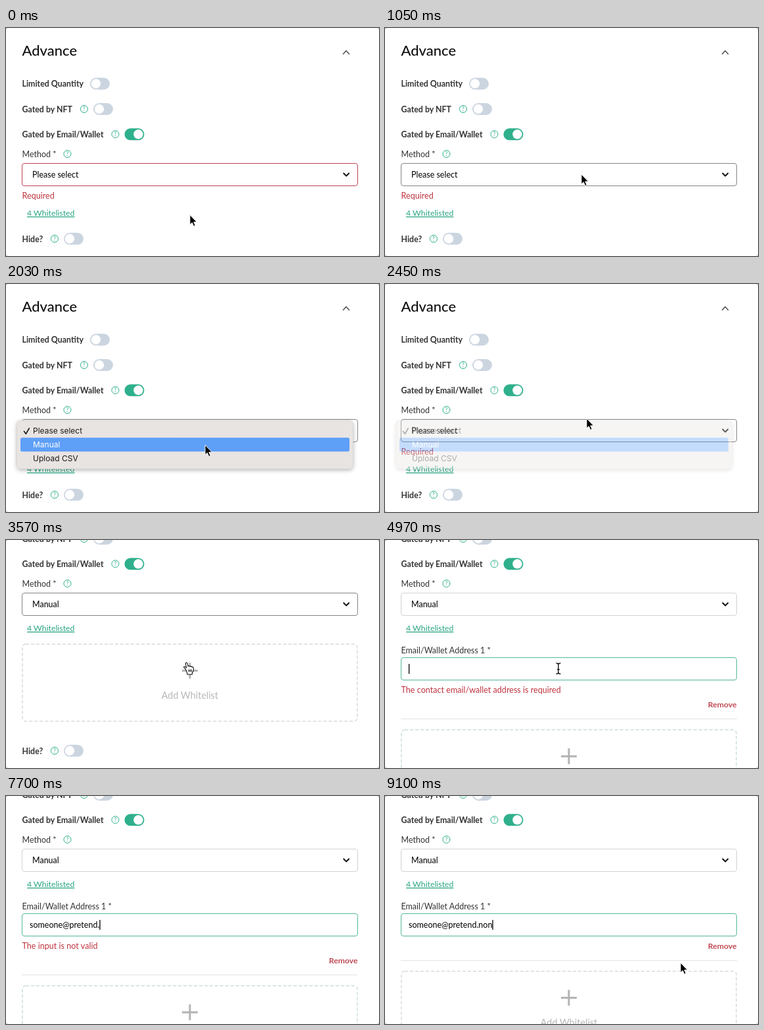
An HTML page for the animation above (9170 ms loop, 568 by 346 pixels).

```html
<!DOCTYPE html>
<html lang="en">
<head>
<meta charset="utf-8">
<title>Whitelist form</title>
<style>
  html, body { margin: 0; width: 100%; height: 100%; overflow: hidden; background: #c4c4c4; }
  svg { display: block; width: 100vw; height: 100vh; }
  text { font: 12.5px Lato, "Open Sans", sans-serif; fill: #333; white-space: pre; }
  .title { font-size: 22px; font-weight: 500; fill: #111; }
  .label { font-size: 12.4px; font-weight: 700; }
  .value { fill: #000; }
  .error { font-size: 12.6px; fill: #c0343f; }
  .remove { font-size: 12.2px; font-weight: 700; fill: #c04a54; text-anchor: end; }
  .link { font-size: 12.3px; fill: #27a583; text-decoration: underline; }
  .add { font-size: 14.4px; fill: #b8b8b8; text-anchor: middle; }
  .help { font-size: 8.5px; fill: #2fb08c; text-anchor: middle; }
  .menu text { font: 12px Inter, Roboto, sans-serif; fill: #1c1c1c; }
  .menu text.on { fill: #fff; }
  .line { fill: none; stroke-linecap: round; stroke-linejoin: round; }
</style>
</head>
<body>
<svg id="stage" viewBox="0 0 568 346" preserveAspectRatio="none"></svg>
<script>
const LOOP = 9170, STEP = 70;
const EMAIL = 'someone@pretend.non';
const OPEN = 1120, PICKED = 2590, ADDED = 3780, FOCUSED = 3990, BLINK = 490;

const text = (x, y, s, cls = '', id = '') =>
  `<text x="${x}" y="${y}" class="${cls}" ${id && `id="${id}"`}>${s}</text>`;
const help = (x, y) =>
  `<circle cx="${x}" cy="${y}" r="5.5" fill="none" stroke="#2fb08c"/>` + text(x, y + 3, '?', 'help');
const toggle = (x, y, on) =>
  `<rect x="${x}" y="${y - 9}" width="30" height="18" rx="9" fill="${on ? '#2fb08c' : '#cbd5e0'}"/>` +
  `<circle cx="${x + (on ? 21 : 9)}" cy="${y}" r="7.2" fill="#fff"/>`;
const box = (id, y) =>
  `<rect id="${id}" x="24.5" y="${y}" width="511" height="34" rx="3.5" fill="#fff"/>`;
const menuRow = (i, s) =>
  text(41, 227.3 + 21 * i, s, '', 'row' + i);

const stage = document.getElementById('stage');
stage.innerHTML = `
  <defs>
    <filter id="shadow" x="-5%" y="-20%" width="110%" height="150%">
      <feDropShadow dx="0" dy="2" stdDeviation="3" flood-opacity=".28"/>
    </filter>
  </defs>
  <rect width="568" height="346" rx="4" fill="#fff"/>
  <g id="form">
    ${text(24.5, 41.5, 'Advance', 'title')}
    <path class="line" d="M513.5 39.5l4.5-5 4.5 5" stroke="#555" stroke-width="1.6"/>
    ${text(24.5, 89, 'Limited Quantity', 'label')}${toggle(128, 84.5)}
    ${text(24.5, 127.5, 'Gated by NFT', 'label')}${help(119, 123)}${toggle(133, 123)}
    ${text(24.5, 166, 'Gated by Email/Wallet', 'label')}${help(166.5, 161.2)}${toggle(180.5, 161.3, true)}
    ${text(24.5, 195.5, 'Method *')}${help(93.5, 191)}
    ${box('select', 205.5)}
    ${text(40, 227, '', 'value', 'choice')}
    <path class="line" d="M514.2 220.5l4 4 4-4" stroke="#111" stroke-width="1.9"/>
    ${text(24.5, 259, 'Required', 'error', 'required')}
  </g>
  <g id="listed">${text(32, 285, '4 Whitelisted', 'link')}</g>
  <g id="hide">${text(24.5, 324.5, 'Hide?', 'label')}${help(74, 319.8)}${toggle(88, 319.8)}</g>
  <g id="field">
    ${text(24.5, 172, 'Email/Wallet Address 1 *')}
    ${box('input', 178.5)}
    ${text(36, 200, '', 'value', 'typed')}
    <rect id="caret" y="188" width="1.3" height="15" fill="#000"/>
    ${text(24.5, 232.3, '', 'error', 'message')}
    <g id="remove">
      ${text(535.5, 254.2, 'Remove', 'remove')}
      <path d="M24 271.5H536" stroke="#e4e4e4"/>
    </g>
  </g>
  <g id="add">
    <rect id="dash" x="25" y="158" width="510" height="117" rx="5" fill="none" stroke-width="2" stroke-dasharray="5 3"/>
    <path d="M268 198.2h24M280 186.2v24" stroke="#b3b3b3" stroke-width="3"/>
    ${text(280, 240.5, 'Add Whitelist', 'add')}
  </g>
  <g id="menu" class="menu">
    <rect x="16.5" y="207" width="512" height="73.5" rx="6" fill="#e8e4e2" stroke="#d2cfce" stroke-width=".6" filter="url(#shadow)"/>
    <rect id="mark" x="22" width="501" height="21" rx="2.5" fill="#5e9ff8"/>
    <path id="check" class="line" d="M27.5 223.5l2.8 4 5-8.5" stroke-width="1.6"/>
    ${menuRow(0, 'Please select')}${menuRow(1, 'Manual')}${menuRow(2, 'Upload CSV')}
  </g>
  <g id="pointer">
    <path id="arrow" d="M0 0V15L3.4 11.9 5.8 17.4 8.3 16.3 5.9 11H10.6Z" fill="#000" stroke="#fff" stroke-width="1"/>
    <path id="hand" d="M-3 10L-5.5 7.6Q-6.3 6.2-4.6 6-3.4 6.2-1.8 8L-3 2Q-3.2 .2-1.8 0-.6-.1-.2 1.4L.8 6Q1 4.6 2.4 4.8 3.4 5 3.6 6.4 4.2 5.2 5.4 5.6 6.4 6 6.5 7 7.6 6.2 8.6 7.2 9.4 8.4 9 11 8.7 14 7 15.5V18H-.5V16Q-1.5 14-3 10ZM2 10.5V14M4 10.5V14M6 10.5V14" fill="#fff" stroke="#111" stroke-width="1.1" stroke-linejoin="round"/>
    <path id="beam" d="M-3.5-8.2Q0-8.2 0-6 0-8.2 3.5-8.2M0-6.5V6.5M-3.5 8.2Q0 8.2 0 6 0 8.2 3.5 8.2M-1.8 1.5H1.8" fill="none" stroke="#000" stroke-width="1.3"/>
  </g>`;

const ui = {};
stage.querySelectorAll('[id]').forEach(el => ui[el.id] = el);

const show = (el, on) => el.setAttribute('display', on ? 'inline' : 'none');
const move = (el, x, y) => el.setAttribute('transform', `translate(${x} ${y})`);
const stroke = (el, c) => el.setAttribute('stroke', c);
const say = (el, s) => { if (el.textContent !== s) el.textContent = s; };

// time, x, y of the pointer
const PATH = [
  [0, 280, 283.5], [700, 298, 197], [1050, 299, 222], [1470, 299, 222], [1540, 301, 239],
  [1960, 303, 245], [2310, 304, 238], [2450, 307, 204], [2520, 308, 171], [3290, 308, 171],
  [3570, 276.5, 186], [3780, 276.5, 186], [3850, 276, 193], [4270, 267, 194], [4480, 264, 195],
  [8330, 264, 195], [9100, 450, 253], [LOOP, 450, 253]
];

function pointerAt(t) {
  const i = PATH.findIndex(p => p[0] > t);
  const [t0, x0, y0] = PATH[i - 1], [t1, x1, y1] = PATH[i];
  const u = (t - t0) / (t1 - t0), k = u * u * (3 - 2 * u);
  return [x0 + (x1 - x0) * k, y0 + (y1 - y0) * k];
}

function keyTime(i) {
  if (i < 7) return 5600 + 140 * i;
  if (i < 15) return 6650 + 130 * (i - 7);
  return [7700, 7840, 7980, 8050][i - 15];
}

function render(t) {
  const picked = t >= PICKED, added = t >= ADDED, focused = t >= FOCUSED;
  let count = 0;
  while (count < EMAIL.length && keyTime(count) <= t) count++;
  const valid = count >= EMAIL.length - 1;

  move(ui.form, 0, picked ? -125 : 0);
  move(ui.listed, 0, picked ? -147 : 0);
  say(ui.choice, picked ? 'Manual' : 'Please select');
  show(ui.required, !picked);
  stroke(ui.select, t < 1050 ? '#bd4552' : added ? '#d3d3d3' : '#858585');
  show(ui.hide, !added);

  show(ui.add, picked);
  move(ui.add, 0, !added ? 0 : valid ? 108 : 130);
  stroke(ui.dash, added && !valid ? '#d6e8e4' : '#e3e3e3');

  show(ui.field, added);
  stroke(ui.input, focused ? '#55b79d' : '#d3d3d3');
  say(ui.typed, EMAIL.slice(0, count));
  say(ui.message, valid ? '' : count ? 'The input is not valid' : 'The contact email/wallet address is required');
  move(ui.remove, 0, valid ? -22 : 0);

  const since = t - (count ? keyTime(count - 1) : FOCUSED);
  show(ui.caret, focused && since % (2 * BLINK) < BLINK);
  ui.caret.setAttribute('x', 36 + (count ? ui.typed.getComputedTextLength() : 0));

  const open = t >= OPEN && t < PICKED;
  const row = t < 1540 ? 0 : 1;
  show(ui.menu, open);
  ui.menu.setAttribute('opacity', t < 2380 ? 1 : t < 2450 ? 0.7 : t < 2520 ? 0.36 : 0.1);
  ui.mark.setAttribute('y', 212.5 + 20.7 * row);
  stroke(ui.check, row ? '#1c1c1c' : '#fff');
  for (let i = 0; i < 3; i++) ui['row' + i].classList.toggle('on', i === row);

  const [x, y] = pointerAt(t);
  const overInput = added && y < 213;
  const overAdd = t >= 3290 && !added;
  move(ui.pointer, x, y);
  show(ui.pointer, !count || t >= 8400);
  show(ui.hand, overAdd);
  show(ui.beam, overInput);
  show(ui.arrow, !overAdd && !overInput);
}

let start;
function tick(now) {
  start ??= now;
  const t = (now - start) % LOOP;
  render(Math.floor(t / STEP) * STEP);
  requestAnimationFrame(tick);
}
render(0);
requestAnimationFrame(tick);
</script>
</body>
</html>
```
